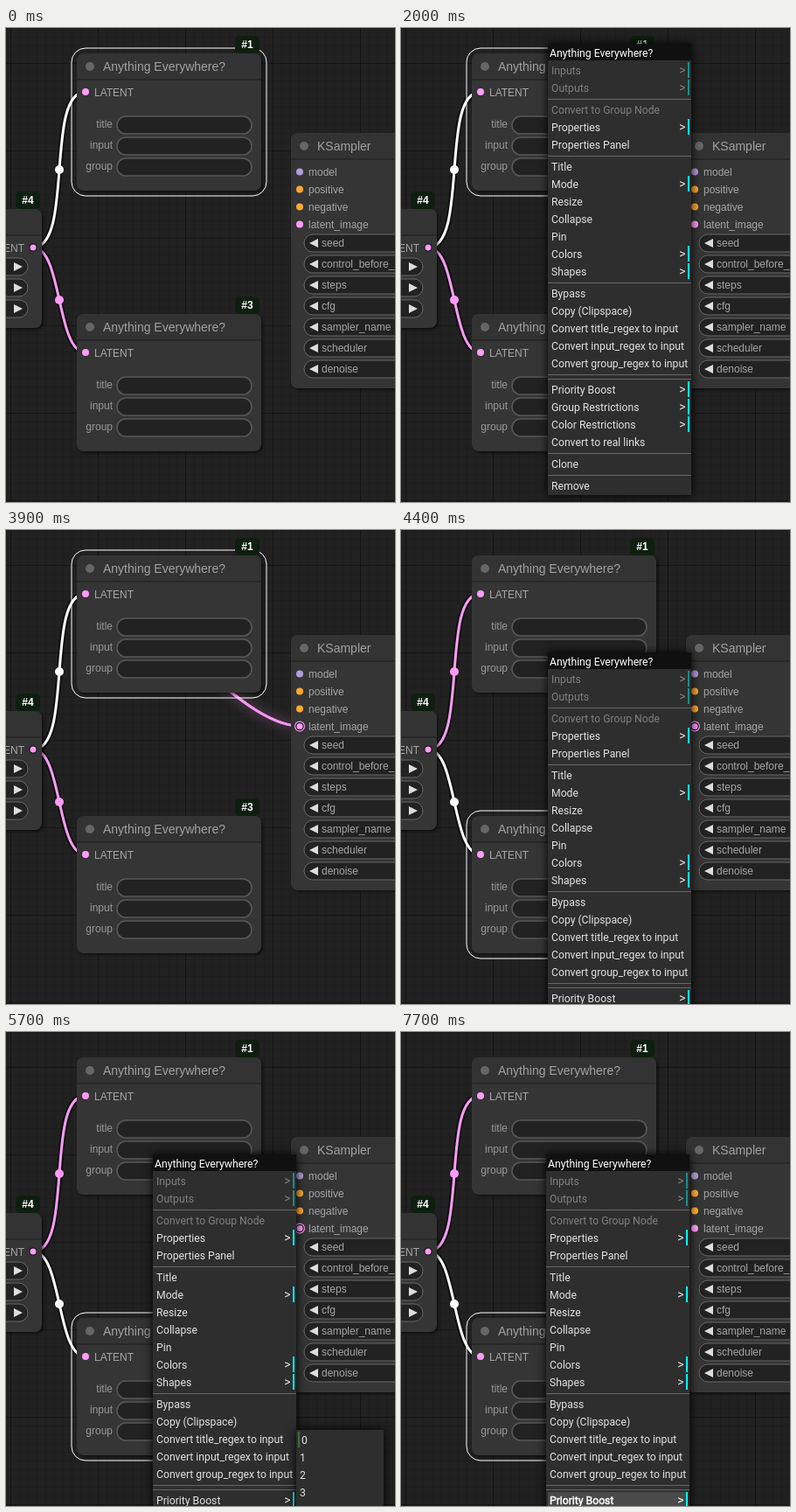
Animation of 445x542 px, one loop 8000 ms. Source, as an HTML page with a canvas:

```html
<!DOCTYPE html>
<html lang="en">
<head>
<meta charset="utf-8">
<title>Node graph</title>
<style>
html, body { margin: 0; width: 100%; height: 100%; overflow: hidden; background: #212121; }
canvas { display: block; }
</style>
</head>
<body>
<canvas id="stage" width="445" height="542"></canvas>
<script>
const ctx = document.getElementById('stage').getContext('2d');
const W = 445, H = 542, LOOP = 8000;
const NODE_FONT = '"Liberation Sans", Arial, sans-serif';
const MENU_FONT = '12.2px Roboto, "Open Sans", sans-serif';
const MARK_FONT = '14px Roboto, "Open Sans", sans-serif';
const PINK = '#ff9cf9', WHITE = '#ffffff';

const MENU = [
  '>!Inputs', '>!Outputs', '-',
  '!Convert to Group Node', '>Properties', 'Properties Panel', '-',
  'Title', '>Mode', 'Resize', 'Collapse', 'Pin', '>Colors', '>Shapes', '-',
  'Bypass', 'Copy (Clipspace)', 'Convert title_regex to input',
  'Convert input_regex to input', 'Convert group_regex to input', '-', '-',
  '>Priority Boost', '>Group Restrictions', '>Color Restrictions',
  'Convert to real links', '-', 'Clone', '-', 'Remove'
];
const INPUT = 'Convert input_regex to input', GROUP = 'Convert group_regex to input';
const BOOST = 'Priority Boost';

// Each track is a list of [start time, value] steps.
const HOVER = [
  [0, ''], [1500, INPUT], [1600, ''], [1800, INPUT], [1900, GROUP], [2000, ''],
  [2100, BOOST], [2700, ''], [2800, 'Group Restrictions'], [2900, ''],
  [4600, 'Collapse'], [4700, ''], [5000, INPUT], [5100, GROUP], [5200, BOOST],
  [5700, ''], [7500, GROUP], [7600, ''], [7700, BOOST]
];
const MENU_POS = [
  [0, null], [900, [168, 18]], [3400, null], [4400, [168, 140]],
  [6300, null], [7200, [166, 140]]
];
const SUB_TOP = [[0, null], [2400, 398], [3400, null], [5500, 455], [6300, null]];
const GLOW = [[0, 0], [3400, 0.45], [3600, 1], [3900, 0.7], [6300, 0]];

function at(track, t) {
  let value = track[0][1];
  for (const [start, v] of track) if (t >= start) value = v;
  return value;
}

function box(x, y, w, h, r, fill, stroke, lw = 1) {
  ctx.beginPath();
  ctx.roundRect(x, y, w, h, r);
  if (fill) { ctx.fillStyle = fill; ctx.fill(); }
  if (stroke) { ctx.strokeStyle = stroke; ctx.lineWidth = lw; ctx.stroke(); }
}

function rect(x, y, w, h, fill) {
  ctx.fillStyle = fill;
  ctx.fillRect(x, y, w, h);
}

function dot(x, y, r, fill) {
  ctx.beginPath();
  ctx.arc(x, y, r, 0, Math.PI * 2);
  ctx.fillStyle = fill;
  ctx.fill();
}

function text(str, x, y, color, font, align = 'left') {
  ctx.font = font;
  ctx.textAlign = align;
  ctx.fillStyle = color;
  ctx.fillText(str, x, y);
}

function label(str, x, y, align, color = '#a6a6a6') {
  text(str, x, y, color, '12px ' + NODE_FONT, align);
}

function shadow(color, blur, offset) {
  ctx.shadowColor = color;
  ctx.shadowBlur = blur;
  ctx.shadowOffsetX = ctx.shadowOffsetY = offset;
}

function grid() {
  rect(0, 0, W, H, '#212121');
  for (let x = 5; x < W; x += 10) rect(x, 0, 1, H, 'rgba(0,0,0,.09)');
  for (let y = 0; y < H; y += 10) rect(0, y, W, 1, 'rgba(0,0,0,.09)');
  for (let x = 5; x < W; x += 100) rect(x, 0, 1, H, 'rgba(0,0,0,.28)');
  for (let y = 40; y < H; y += 100) rect(0, y, W, 1, 'rgba(0,0,0,.28)');
}

function spline(x1, y1, x2, y2) {
  const d = Math.hypot(x2 - x1, y2 - y1) / 4;
  ctx.beginPath();
  ctx.moveTo(x1, y1);
  ctx.bezierCurveTo(x1 + d, y1, x2 - d, y2, x2, y2);
}

function strokeLine(color, width) {
  ctx.strokeStyle = color;
  ctx.lineWidth = width;
  ctx.stroke();
}

function link(x, y, color) {
  spline(31, 251, x, y);
  strokeLine('rgba(0,0,0,.5)', 7);
  strokeLine(color, 3);
  dot((31 + x) / 2, (251 + y) / 2, 5, color);
}

function glowLink(glow) {
  ctx.save();
  spline(91, 73, 336, 224);
  shadow(PINK, 6 + 10 * glow, 0);
  strokeLine(`rgba(255,156,249,${0.3 + 0.4 * glow})`, 3);
  ctx.restore();
  strokeLine('#f894f2', 3);
}

function ringed(x, y, outer, gap, inner) {
  dot(x, y, gap + 1.2, outer);
  dot(x, y, gap, '#101010');
  dot(x, y, inner, PINK);
}

function node(x, y, w, h, title, selected) {
  ctx.save();
  shadow('rgba(0,0,0,.5)', 3, 2);
  box(x, y - 30, w, h + 30, 8, '#353535');
  ctx.restore();
  box(x, y - 30, w, 30, [8, 8, 0, 0], '#333333');
  rect(x, y - 1, w, 2, 'rgba(0,0,0,.22)');
  if (selected) box(x - 6, y - 36, w + 12, h + 42, 16, null, WHITE);
  if (title) {
    dot(x + 15, y - 15, 5, '#666666');
    text(title, x + 30, y - 10, '#a2a2a2', '14px ' + NODE_FONT);
  }
}

function badge(str, right, y) {
  box(right - 30, y, 28, 20, 5, '#0f1f0f');
  text(str, right - 16, y + 14, WHITE, 'bold 12px ' + NODE_FONT, 'center');
}

function everywhere(y, tag, selected) {
  node(81, y, 211, 127, 'Anything Everywhere?', selected);
  badge(tag, 292, y - 50);
  dot(91, y + 14, 4, PINK);
  label('LATENT', 101, y + 18.5);
  ['title', 'input', 'group'].forEach((name, i) => {
    const cy = y + 52 + i * 24;
    box(127, cy - 10, 154, 20, 10, '#222222', '#575757', 1.6);
    label(name, 122, cy + 3, 'right', '#999999');
  });
}

function arrow(x, y, dir) {
  ctx.beginPath();
  ctx.moveTo(x, y - 5);
  ctx.lineTo(x + 10 * dir, y);
  ctx.lineTo(x, y + 5);
  ctx.fillStyle = '#dddddd';
  ctx.fill();
}

function latentNode() {
  node(-180, 237, 221, 106, '', false);
  badge('#4', 41, 187);
  ringed(31, 251, '#353535', 4.5, 3.5);
  label('LATENT', 21, 255.5, 'right');
  for (let y = 273; y < 330; y += 24) {
    box(-165, y - 10, 190, 20, 10, '#222222', '#666666');
    arrow(9, y, 1);
  }
}

function sampler(linked) {
  node(326, 150, 260, 262, 'KSampler', false);
  const inputs = [['model', '#b39ddb'], ['positive', '#ffa931'],
    ['negative', '#ffa931'], ['latent_image', PINK]];
  inputs.forEach(([name, color], i) => {
    const y = 164.5 + i * 20;
    if (linked && i === 3) ringed(336, y, PINK, 4.8, 3.6);
    else dot(336, y, 4, color);
    label(name, 346, y + 4.5);
  });
  const widgets = ['seed', 'control_before_generate', 'steps', 'cfg',
    'sampler_name', 'scheduler', 'denoise'];
  widgets.forEach((name, i) => {
    const y = 246 + i * 24;
    box(341, y - 10, 230, 20, 10, '#222222', '#666666');
    arrow(357, y, -1);
    label(name, 361, y + 4);
  });
}

function menuText(str, x, y, color, bold) {
  text(str, x, y, color, MENU_FONT);
  if (bold) {
    ctx.strokeStyle = color;
    ctx.lineWidth = 0.45;
    ctx.strokeText(str, x, y);
  }
}

function panel(x, y, w, h) {
  ctx.save();
  shadow('#000', 10, 0);
  rect(x, y, w, h, '#2e2e2e');
  ctx.restore();
}

function menu([x, y], hover) {
  panel(x, y, 164, 516);
  rect(x, y, 164, 19, '#101010');
  menuText('Anything Everywhere?', x + 2, y + 15, WHITE, false);
  let cy = y + 30;
  for (const entry of MENU) {
    if (entry === '-') {
      rect(x, cy - 7, 164, 1, '#666666');
      cy += 5;
      continue;
    }
    const name = entry.replace(/^>?!?/, '');
    const on = name === hover;
    if (on) rect(x + 2, cy - 9, 160, 18, '#4a4a4a');
    ctx.globalAlpha = entry.includes('!') ? 0.45 : 1;
    const color = on ? WHITE : '#e2e2e2';
    menuText(name, x + 4, cy + 5, color, on);
    if (entry[0] === '>') {
      text('>', x + 157.5, cy + 5, color, MARK_FONT, 'right');
      rect(x + 160, cy - 9, 2, 18, '#00ffff');
    }
    ctx.globalAlpha = 1;
    cy += 20;
  }
}

function submenu(top, t) {
  panel(332, top, 100, H);
  const lit = t >= 3000 && t < 3400;
  const bold = lit || t >= 5900;
  for (let i = 0; top + 2 + i * 20 < H; i++) {
    const y = top + 2 + i * 20;
    const on = i === 1 && bold;
    if (i === 1 && lit) rect(334, y, 96, 18, '#4a4a4a');
    if (i === 0) rect(334, y, 2, 18, '#3a703a');
    menuText(String(i), i ? 336 : 338, y + 14, on ? WHITE : '#e2e2e2', on);
  }
}

function draw(t) {
  const first = t < 4400;
  const glow = at(GLOW, t);
  const pos = at(MENU_POS, t);
  const top = at(SUB_TOP, t);
  grid();
  link(91, 73, first ? WHITE : PINK);
  link(91, 371, first ? PINK : WHITE);
  if (glow) glowLink(glow);
  latentNode();
  everywhere(59, '#1', first);
  everywhere(357, '#3', !first);
  sampler(glow > 0);
  if (pos) menu(pos, at(HOVER, t));
  if (top) submenu(top, t);
}

const begin = performance.now();
function tick() {
  draw((performance.now() - begin) % LOOP);
  requestAnimationFrame(tick);
}
tick();
</script>
</body>
</html>
```
